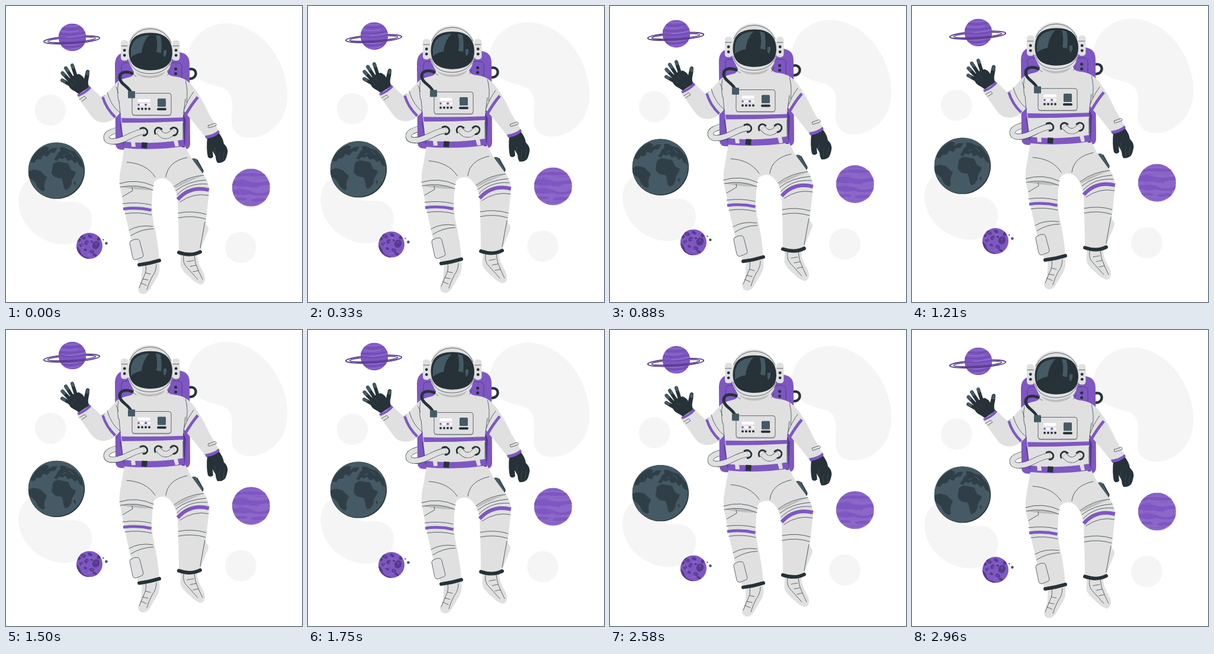
Recreate the animation shown at these times as an HTML page with a canvas. Size 500 px wide and 500 px high, loop 3 s.

```html
<!DOCTYPE html>
<html lang="en">
<head>
<meta charset="utf-8">
<title>Floating astronaut</title>
<style>
html, body { margin: 0; width: 100%; height: 100%; overflow: hidden; background: #fff; }
canvas { display: block; width: 500px; height: 500px; }
</style>
</head>
<body>
<canvas id="stage"></canvas>
<script>
const LOOP = 3000, LEAD = 20, RISE = 10;
const SUIT = '#e0e0e0', SHADE = '#bdbdbd', INK = '#263238', SLATE = '#455a64';
const PURPLE = '#7e57c2', DEEP = '#573a8b', PALE = '#9576cd', MIST = '#f5f5f5';

const canvas = document.getElementById('stage');
const ctx = canvas.getContext('2d');
const dpr = window.devicePixelRatio || 1;
canvas.width = canvas.height = 500 * dpr;

const paths = new Map();
function path(d) {
  if (!paths.has(d)) paths.set(d, new Path2D(d));
  return paths.get(d);
}
function fill(d, color) {
  ctx.fillStyle = color;
  ctx.fill(path(d));
}
function line(d, width = 0.7, color = INK, cap = 'round') {
  ctx.lineWidth = width;
  ctx.strokeStyle = color;
  ctx.lineCap = cap;
  ctx.stroke(path(d));
}
const stripe = (d, width) => line(d, width, PURPLE, 'butt');
function oval(x, y, rx, ry, color, turn = 0) {
  ctx.beginPath();
  ctx.ellipse(x, y, rx, ry, turn, 0, 2 * Math.PI);
  ctx.fillStyle = color;
  ctx.fill();
}
const dot = (x, y, r, color) => oval(x, y, r, r, color);
function box(x, y, w, h, r, color) {
  ctx.beginPath();
  ctx.roundRect(x, y, w, h, r);
  ctx.fillStyle = color;
  ctx.fill();
}
function globe(x, y, r, color, details) {
  ctx.save();
  ctx.beginPath();
  ctx.arc(x, y, r, 0, 2 * Math.PI);
  ctx.clip();
  ctx.fillStyle = color;
  ctx.fillRect(x - r, y - r, 2 * r, 2 * r);
  details();
  ctx.restore();
}

function backdrop() {
  fill('M307 90C306 58 335 30 372 29.5C415 31 446 62 462 95C476 125 481 160 468 186C456 209 434 223 412 223C392 223 381 211 381 193C381 176 385 160 377 147C368 134 348 137 328 125C313 115 307 105 307 90Z', MIST);
  fill('M21 333C20 312 32 292 50 290C72 290 66 322 90 330C105 333 118 328 130 335C141 341 146 351 145 364C143 388 122 403 98 403C56 402 23 368 21 333Z', MIST);
  dot(75, 176, 26.3, MIST);
  dot(396.5, 408, 26.4, MIST);
}

function ring(from, to) {
  for (const [rx, ry, w] of [[47.3, 6.1, 1.9], [40.5, 3.9, 1.6]]) {
    ctx.beginPath();
    ctx.ellipse(111, 57.3, rx, ry, -0.065, from, to);
    ctx.lineWidth = w;
    ctx.strokeStyle = DEEP;
    ctx.stroke();
  }
}

function ringed() {
  ring(Math.PI, 2 * Math.PI);
  globe(112, 53, 23.4, PURPLE, () => {
    line('M92 37Q112 42 132 35M88 47Q112 51 136 44M89 54Q112 57 136 51M92 67Q112 73 134 64', 1.4, '#6a48a8');
    line('M97 33Q112 36 126 32M90 42Q108 46 122 42M104 53Q122 52 136 48M91 64Q110 69 136 60M99 74Q112 74 123 71', 1.3, PALE);
  });
  ring(0, Math.PI);
}

function earth() {
  globe(85.4, 278.3, 47.7, INK, () => {
    dot(84.3, 277.3, 47.4, SLATE);
    fill('M41 264C46 249 56 241 67 237L73 240L70 245L79 240L87 240L82 248L75 248L70 255L63 252L59 259L51 260L48 265Z', '#303f47');
    fill('M37 281C46 273 52 278 58 279C62 282 64 286 69 289C67 296 64 299 65 306C66 310 66 313 62 313C55 310 52 305 50 299C44 293 41 290 37 291Z', '#303f47');
    fill('M85 254L88 248L92 245L91 239L98 239L106 243L116 246L128 261L131 274L124 270L121 263L116 266L111 260L104 262L100 256L95 259L90 257L86 262L81 260Z', '#303f47');
    fill('M79 268Q86 261 93 264L105 266L110 277L118 281C116 290 110 292 111 300C108 307 105 311 100 311C95 304 98 297 93 291C87 292 80 289 77 282Z', '#303f47');
    fill('M114 299Q119 292 117 304Z', '#303f47');
    line('M86 239L89 235M107 247L114 254M96 253L101 251', 1.1, SLATE);
  });
}

function banded() {
  globe(414, 307, 32, PALE, () => {
    dot(413.2, 306.4, 31.6, '#8b68c8');
    fill('M388 285Q407 280 439 284L441 287Q422 290 401 287Q395 289 386 290Z', PURPLE);
    fill('M382 297Q396 291 409 296T446 295L446 302Q430 303 425 306Q415 308 408 305Q394 307 382 303Z', PURPLE);
    fill('M383 311Q404 308 417 314T446 312L446 318Q428 323 412 318Q397 322 384 317Z', PURPLE);
    fill('M386 325Q396 322 407 325L407 328Q396 329 388 328ZM414 327Q429 323 440 326L436 330Q424 332 414 330Z', PURPLE);
    line('M396 280Q414 276 430 280M390 292L407 293M420 291L440 291M391 308L402 309M402 333Q415 336 427 333', 1, PURPLE);
    dot(424, 307, 1.2, PURPLE);
  });
}

function cratered() {
  globe(141, 405.2, 22, PURPLE, () => {
    fill('M117 405Q124 408 126 416T141 426L139 429L115 425Z', DEEP);
    for (const [x, y, rx, ry] of [[130, 391, 5, 3], [142, 389, 4, 2.4], [152, 404, 6, 7], [136, 400, 3, 4], [127, 404, 3, 3], [145, 415, 4, 3], [157, 393, 3, 4], [150, 421, 4, 2], [134, 412, 3, 2], [145, 398, 2, 2], [124, 396, 2, 3]])
      oval(x, y, rx, ry, DEEP, 0.5);
    for (const [x, y] of [[152, 402], [130, 391], [145, 415], [137, 400]]) dot(x, y, 1.8, '#6c49aa');
    line('M125 400L131 409M140 394L149 396M138 421L144 419', 1, PALE);
  });
  dot(164.3, 395, 1.2, SLATE);
  dot(169.4, 401, 2.3, SLATE);
}

function tube(d) {
  line(d, 10, INK, 'butt');
  line(d, 8.8, SUIT, 'butt');
}

function backpack() {
  tube('M186 228.6Q182 229 180 229C167 228.5 167 219 176 214C182 211 188 209 198 208');
  line('M309 107C324 103 325 124 309 123', 4.2);
  fill('M184 98Q185 79 204 78H290Q310 79 310 98L311 232Q311 243 300 243H196Q185 243 185 232Z', PURPLE);
  line('M195 126V103Q195 96 202 96H211M278 96H290Q297 96 297 103V126', 0.7, '#49306f');
  dot(286.6, 106.5, 2.5, INK);
  dot(286.6, 114.5, 2.5, INK);
}

function leftArm() {
  for (const d of ['M121 128L112 100.5', 'M116 128L101 105', 'M112 131L95.5 113.5', 'M110 134L95 125.5']) line(d, 5.9);
  line('M113.3 103.5L112 100M104 109L101 105M98.3 116.5L95.2 113M98.5 127.5L94.8 125.5', 5.3, SLATE);
  fill('M106 124Q115 116 123 115Q130 118 132 123L135 110Q138 106 141 110Q141 118 139 126Q138 133 141 137L123 149Q118 145 112 142Q104 137 106 128Z', INK);
  line('M138 112L137.5 115', 4.8, SLATE);
  line('M109 130L114 136M114 125L118 130', 0.6, SLATE);
  fill('M220 119C208 121 194 123 187 129L163 156L143 137L119.5 152L143 185Q151 197 165 197Q182 196 194 179Z', SUIT);
  fill('M120 150Q134 145 141 135L144 139Q136 148 122.5 153.5Z', PURPLE);
  line('M124 158L133 152.5L136 156L128 161', 0.7);
  stripe('M163.5 154Q169 173 184.5 188', 4.4);
  line('M171 146Q177 168 192 180M190 129Q187 144 190 160', 0.7);
  line('M186 137L190 147M162 154L167 151', 0.6);
}

function rightArm() {
  fill('M340 222L359 214Q367 224 368 233Q374 238 374.5 246Q373 256 370 261Q365 266 357 265Q354 260 354 254L349 245L350 255Q345 260 341 255Q338 242 340 222Z', INK);
  line('M354 253Q351 245 353 239M361 262Q359 253 362 246M367 261Q366 253 369 246', 0.6, SLATE);
  fill('M268 119C290 119 302 121 313 133Q328 150 343 183L360 212Q351 221 337 222L318 198Q303 181 297 173Z', SUIT);
  fill('M336 219.5Q351 217.5 359 210L361 214Q353 222.5 338 224.5Z', PURPLE);
  line('M342 202Q348 200 353 198Q356 199 355 202L343 206Q340 205 342 202Z', 0.7);
  stripe('M324 154Q313 167 303 184.5', 4.8);
  line('M317 145Q307 158 300 177M303 126Q308 142 305 163', 0.7);
}

function leftLeg() {
  fill('M230 438L259 434Q261 447 256 457L243 479Q238 487 231 487Q223 485 223 478Q229 466 229 452Z', SUIT);
  line('M236 437Q238 448 233 457L225 476M254 437Q254 448 247 457Q241 468 238 479M236 451L244 453M231 461L240 463M228 468L237 472', 0.7);
  fill('M201 234L192 286Q191 302 194 313L203 359L210 390L223 434L259 430Q257 398 248.5 362Q244 335 249 302Q251 292 265 291L270 234Z', SUIT);
  fill('M194 306Q225 302 248 311Q225 312 194 306Z', SHADE);
  stripe('M198 343Q222 339.5 245.5 345', 4.8);
  line('M204 264Q237 266 252 289M192 300Q221 291 249 304M193 306Q221 300 248 311M197 322L214 312L213 307M197 334Q222 330.5 245 336M201 351Q224 347.5 246 353M208 379Q224 369 248 372.5M211 388Q228 377 249 376.5', 0.75);
  const pocket = 'M211 397Q217 393 223 394Q225 395 226 398L232 421Q232 424 229 425L219 429Q215 429 214 425L209 401Q209 398 211 397Z';
  fill(pocket, SUIT);
  line(pocket);
  line('M225 437.3Q243 435 259 430', 6);
}

function rightLeg() {
  fill('M314 258Q320 256 323 260L333 278Q333 283 329 284L322 281Z', SLATE);
  line('M323 260L333 278Q333 283 329 284', 1.3);
  fill('M335 365L341 373Q343 376 341 381L329 410Z', SUIT);
  fill('M295 420L323 420Q323 433 331 446Q337 456 336 463Q334 471 328 470.5Q318 467 311 459Q295 446 294.5 437Z', SUIT);
  line('M300 422Q298 434 305 441L324 462M318 422Q319 435 325 447L332 462M306 432L317 430M311 440L321 438M316 449L325 447', 0.7);
  fill('M255 234H301L313 257L333 284Q344 299 343 314L337 370L329 413Q311 420 292 414Q292 383 290 330Q289 316 282 304Q275 291 262 291Z', SUIT);
  fill('M285 306Q305 291 331 287Q306 298 286 308Z', SHADE);
  stripe('M290 327Q311 303 342.8 311', 6.2);
  line('M306 256Q273 263 270 289M284 305Q306 288 334 286M287 312Q307 296 338 294M289 319Q309 298 340 301M294 331Q317 315 342 320M291 350Q315 345 338 352M291 358Q315 353 337 360M336 365L328 409', 0.75);
  line('M292 416.5Q312 423.5 328 415.5', 6);
}

function torso() {
  fill('M298 180L304 193L302 239H297Z', DEEP);
  fill('M216 110Q217 119 207 121Q196 123 190 128L193 178L199 236Q245 246 300 236L299 186Q304 160 303 125Q295 120 283 119Q273 118 272 110Z', SUIT);
  fill('M195 189.5Q248 190.5 299 188.5V195Q248 197.5 196 197.5Z', PURPLE);
  fill('M197 229Q248 235 300 226L302 237Q250 245 198 240Z', PURPLE);
  fill('M211 229H218L219 238H212ZM283 228L290 227L292 237L286 238Z', SUIT);
  fill('M229.5 230.5L239 231L238 241L228.5 240Z', INK);
  line('M191 160L193 184M193 198L199 235M299 198L299 225M303 157L300 181', 0.7);
  line('M212 110Q214 117 220 119M277 110L273 117', 0.6);
}

function chest() {
  box(213, 149, 66, 37.3, 4, SHADE);
  box(213, 147.5, 66, 37, 4, SUIT);
  ctx.lineWidth = 0.7;
  ctx.strokeStyle = INK;
  ctx.stroke();
  box(222.5, 157.5, 21, 5, 1.2, '#fff');
  box(221.5, 164.8, 22.5, 4.5, 2, '#eee');
  for (let i = 0; i < 4; i++) {
    const x = 224 + i * 6;
    dot(x, 167, 1.8, i % 2 ? '#fff' : PURPLE);
    dot(x, 174, 2, INK);
  }
  dot(236.3, 167, 1.8, PURPLE);
  box(256, 156.3, 14, 14, 1.5, SLATE);
  box(255, 172.5, 16, 4, 2, INK);
  line('M213 114C201 109 191 113 192 122C193 132 207 136 211 146', 4.8);
  box(206, 144, 12, 11.8, 1, SLATE);
  tube('M233 212C214 214 202 227 186 228.6Q182 229 180 229');
  tube('M257 212C263 217 264 220 271 219.5C278 219 278 215 284 212');
  line('M227 207C234 203 241 210 238 216Q236 219 232 219M252 216C249 207 257 203 263 208M278 208C284 202 293 208 289 215Q287 219 283 219', 2.8);
}

function helmet() {
  fill('M211 101Q217 122 243 123Q269 122 278 101Z', SUIT);
  fill('M218 112Q243 125 269 111Q264 121 244 122Q226 122 218 112Z', SHADE);
  for (const x of [194, 281]) {
    box(x, 58, 12.4, 34.5, 5, SUIT);
    line(`M${x + 1} 67.5H${x + 11}`, 0.7);
    dot(x + 6.2, 75, 2.4, INK);
    dot(x + 6.2, 83.5, 2.4, INK);
  }
  fill('M205 82C204 51 221 36 243 35.5C267 36 283 53 282 83C280 108 263 117 243 117C221 117 207 106 205 82Z', SUIT);
  line('M209 61Q219 39 243 38.5Q269 39 279 62', 0.7);
  line('M208 91Q214 114 243 114.5Q273 114 280 90', 0.7);
  fill('M207.5 78C208 55 220 46 243 45.5C269 45 281 58 281 80C280 101 266 108.5 243 109C219 108 208 99 207.5 78Z', INK);
  fill('M211 82C210 61 220 51 242 49Q231 61 229 79Q220 80 211 87Z', SLATE);
  fill('M253 49L261 51Q264 65 262 80L254 78Q257 64 253 49ZM266 75H271Q272 82 268 87Q265 84 266 75Z', SLATE);
}

function scene() {
  backdrop();
  ringed();
  earth();
  banded();
  cratered();
  backpack();
  leftArm();
  rightArm();
  leftLeg();
  rightLeg();
  torso();
  chest();
  helmet();
}

function frame(now) {
  const phase = ((now + LEAD) % LOOP) / LOOP;
  const lift = RISE * (1 - Math.abs(1 - 2 * phase));
  ctx.setTransform(dpr, 0, 0, dpr, 0, 0);
  ctx.fillStyle = '#fff';
  ctx.fillRect(0, 0, 500, 500);
  ctx.translate(0, -lift);
  ctx.lineJoin = 'round';
  scene();
  requestAnimationFrame(frame);
}
requestAnimationFrame(frame);
</script>
</body>
</html>
```
